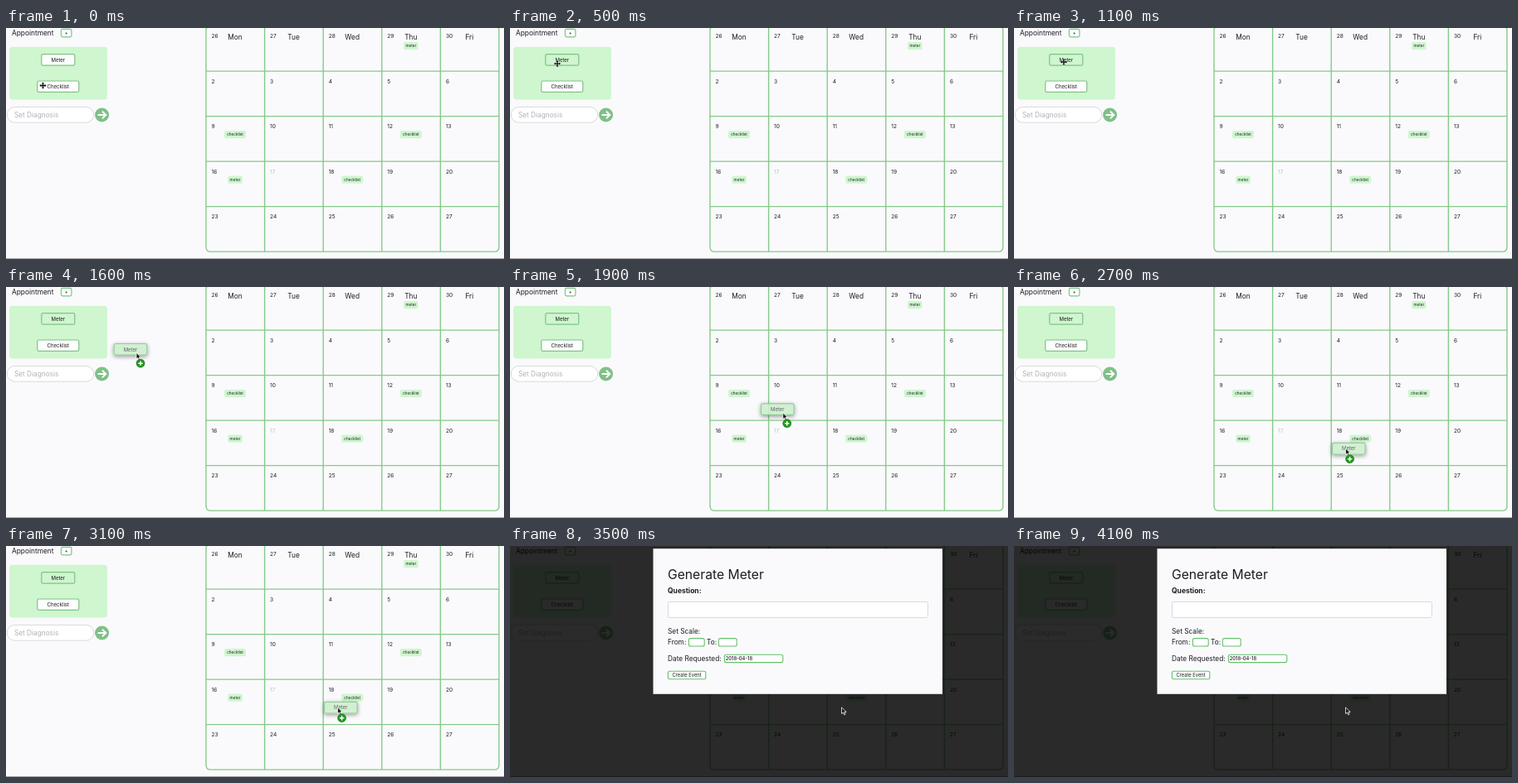
Animation, 600 px wide and 279 px high, one loop 4.9 s. Source, as an HTML page:

```html
<!DOCTYPE html>
<html lang="en">
<head>
<meta charset="utf-8">
<title>Appointment planner</title>
<style>
  html, body { margin: 0; width: 100%; height: 100%; overflow: hidden; background: #fafafc; }
  svg { display: block; width: 600px; height: 279px; }
  text { font-family: Inter, Roboto, sans-serif; fill: #1c1c22; white-space: pre; }
  .mid { text-anchor: middle; }
  .line { fill: none; stroke: #86c98b; stroke-width: 1.4; }
  .panel, .chip, .btn.hover { fill: #cff6cf; }
  .btn { fill: #fdfdfe; stroke: #7fc386; stroke-width: 1.2; }
  .field { fill: #fff; stroke: #66c06c; stroke-width: 1.1; }
  .input { fill: #fff; stroke: #dadadd; stroke-width: 1; }
  .ghost { fill: #cdeece; stroke: #86c58c; stroke-width: 1.2; }
  text.hint { fill: #b2b2b6; }
  text.today { fill: #a6d2ab; }
  text.faded { fill: #4a534b; }
</style>
</head>
<body>
<svg viewBox="0 0 600 279" xmlns="http://www.w3.org/2000/svg">
  <defs>
    <filter id="shadow" x="-30%" y="-60%" width="160%" height="240%">
      <feDropShadow dx="0" dy="1.5" stdDeviation="2.4" flood-color="#000" flood-opacity=".45"/>
    </filter>
  </defs>
  <g id="page"></g>
  <rect id="dim" width="600" height="279" fill="#000" opacity=".83"/>
  <g id="modal"></g>
  <g id="ghost" opacity=".88"></g>
  <g id="cross">
    <path transform="scale(.82)" fill="#111" stroke="#fff" stroke-width=".9" paint-order="stroke"
      d="M0-5L2-2.6H.8V-.8H2.6V-2L5 0L2.6 2V.8H.8V2.6H2L0 5L-2 2.6H-.8V.8H-2.6V2L-5 0L-2.6-2V-.8H-.8V-2.6H-2Z"/>
  </g>
  <g id="arrow">
    <path d="M0 0V7.6L1.8 6L3 8.8L4.4 8.2L3.2 5.5H5.6Z" fill="#111" stroke="#fff" stroke-width=".8"/>
    <g id="copy">
      <circle cx="5" cy="12.7" r="5" fill="#23961f" stroke="#17741a" stroke-width=".6"/>
      <path d="M2.3 12.7H7.7M5 10V15.4" stroke="#fff" stroke-width="1.5"/>
    </g>
  </g>
</svg>
<script>
const $ = id => document.getElementById(id);
let layer;

function add(tag, attrs, text) {
  const el = document.createElementNS('http://www.w3.org/2000/svg', tag);
  for (const k in attrs) el.setAttribute(k, attrs[k]);
  if (text) el.textContent = text;
  return layer.appendChild(el);
}
const box = (cls, x, y, width, height, rx = 2) =>
  add('rect', { class: cls, x, y, width, height, rx });
const label = (text, x, y, size, cls = '', weight = 400) =>
  add('text', { class: cls, x, y, 'font-size': size, 'font-weight': weight }, text);

// Box with its label, both centred on a point
function tag(cls, text, x, y, w, h, size, textCls = '') {
  const el = box(cls, x - w / 2, y - h / 2, w, h, 1.8);
  label(text, x, y + size * .37, size, 'mid ' + textCls);
  return el;
}

function drawPanel() {
  label('Appointment', 7, 8.6, 8.35);
  tag('btn', '+', 72.7, 6.1, 12.5, 9.4, 6);
  box('panel', 4, 22.8, 118, 63.6, 4);
  const meter = tag('btn', 'Meter', 62.8, 38.4, 40, 13.6, 6);
  tag('btn', 'Checklist', 62.8, 70.7, 50, 13.4, 6.1);
  box('input', 1.2, 95.4, 104.6, 18.8, 9.4);
  label('Set Diagnosis', 10, 108, 8.25, 'hint');
  add('circle', { cx: 115.6, cy: 105, r: 8.5, fill: '#80c087' });
  add('path', {
    d: 'M110.6 105H120M116 100.7L120.4 105L116 109.3',
    fill: 'none', stroke: '#fff', 'stroke-width': 1.9
  });
  return meter;
}

function drawCalendar() {
  const left = 241, top = -2.4, cellW = 70.6, cellH = 54.5;
  const tasks = { 29: 'meter', 9: 'checklist', 12: 'checklist', 16: 'meter', 18: 'checklist' };
  box('line', left, top, cellW * 5, cellH * 5, 5);
  for (let i = 1; i < 5; i++) {
    const x = left + i * cellW, y = top + i * cellH;
    add('path', { class: 'line', d: `M${x} ${top}v${cellH * 5}M${left} ${y}h${cellW * 5}` });
  }
  ['Mon', 'Tue', 'Wed', 'Thu', 'Fri'].forEach((name, col) => {
    const x = left + col * cellW, center = x + 35;
    label(name, center, 13.8, 8.3, 'mid');
    for (let row = 0; row < 5; row++) {
      const day = col + (row ? row * 7 - 5 : 26), y = top + row * cellH;
      label(String(day), x + 6.5, y + 14.8, 6.6, day === 17 ? 'today' : '');
      const task = tasks[day];
      if (task && (day > 26) === !row) {
        tag('chip', task, center, y + (row ? 22 : 24), 7 + task.length * 2.1, 9.4, 4.7);
      }
    }
  });
  add('rect', { y: 278, width: 600, height: 1, fill: '#a4a4a6' });
}

function drawModal() {
  const x = 190;
  add('rect', { x: 172.5, y: 3.2, width: 348.5, height: 175.6, fill: '#fafafc' });
  label('Generate Meter', x, 40.2, 15.7);
  label('Question:', x, 56.8, 8.5, '', 700);
  box('input', x + .5, 67.5, 313, 19, 1);
  label('Set Scale:', x, 105.8, 8.3);
  label('From:', x, 119.2, 8.3);
  box('field', 215.4, 111.6, 18.8, 9.4);
  label('To:', 237, 119.2, 8.3);
  box('field', 251.4, 111.6, 21.8, 9.4);
  label('Date Requested:', x, 138.6, 8.3);
  box('field', 258.4, 131.2, 70.4, 9.4);
  label('2018-04-18', 259.8, 138.1, 5.8, '', 500);
  tag('field', 'Create Event', 213.1, 156, 45.4, 9.6, 5.8);
}

layer = $('page');
const meter = drawPanel();
drawCalendar();
layer = $('modal');
drawModal();
layer = $('ghost');
tag('ghost', 'Meter', 0, 0, 39.6, 13.6, 6, 'faded').setAttribute('filter', 'url(#shadow)');

const LOOP = 4900, TICK = 100, GRAB = 1400, DROP = 3500;

// Smooth 0 to 1 between two times
function ease(t, from, to) {
  const k = Math.min(1, Math.max(0, (t - from) / (to - from)));
  return k * k * (3 - 2 * k);
}

// Checklist to Meter, a small nudge, then the drag to the 18th
function pointer(t) {
  const hover = ease(t, 0, 600), nudge = ease(t, 800, 1100);
  return [
    44.5 + 13.5 * hover + 2 * nudge + 339.6 * ease(t, 1300, 2150),
    69.5 - 28.5 * hover + 154 * ease(t, 1300, 2220)
  ];
}

const show = (id, on) => $(id).setAttribute('display', on ? 'inline' : 'none');
const move = (id, x, y) => $(id).setAttribute('transform', `translate(${x} ${y})`);

function draw(now) {
  const t = Math.floor(now % LOOP / TICK) * TICK;
  const open = t >= DROP, held = t >= GRAB && !open;
  const [x, y] = pointer(t), [gx, gy] = pointer(t - 20);
  move('cross', x, y);
  move('arrow', x, y);
  move('ghost', gx + 3.7, gy + .2);
  show('cross', t < GRAB);
  show('arrow', t >= GRAB);
  show('copy', held);
  show('ghost', held);
  show('dim', open);
  show('modal', open);
  meter.classList.toggle('hover', t >= 500);
}

const start = performance.now();
function loop() {
  draw(performance.now() - start);
  requestAnimationFrame(loop);
}
loop();
</script>
</body>
</html>
```
